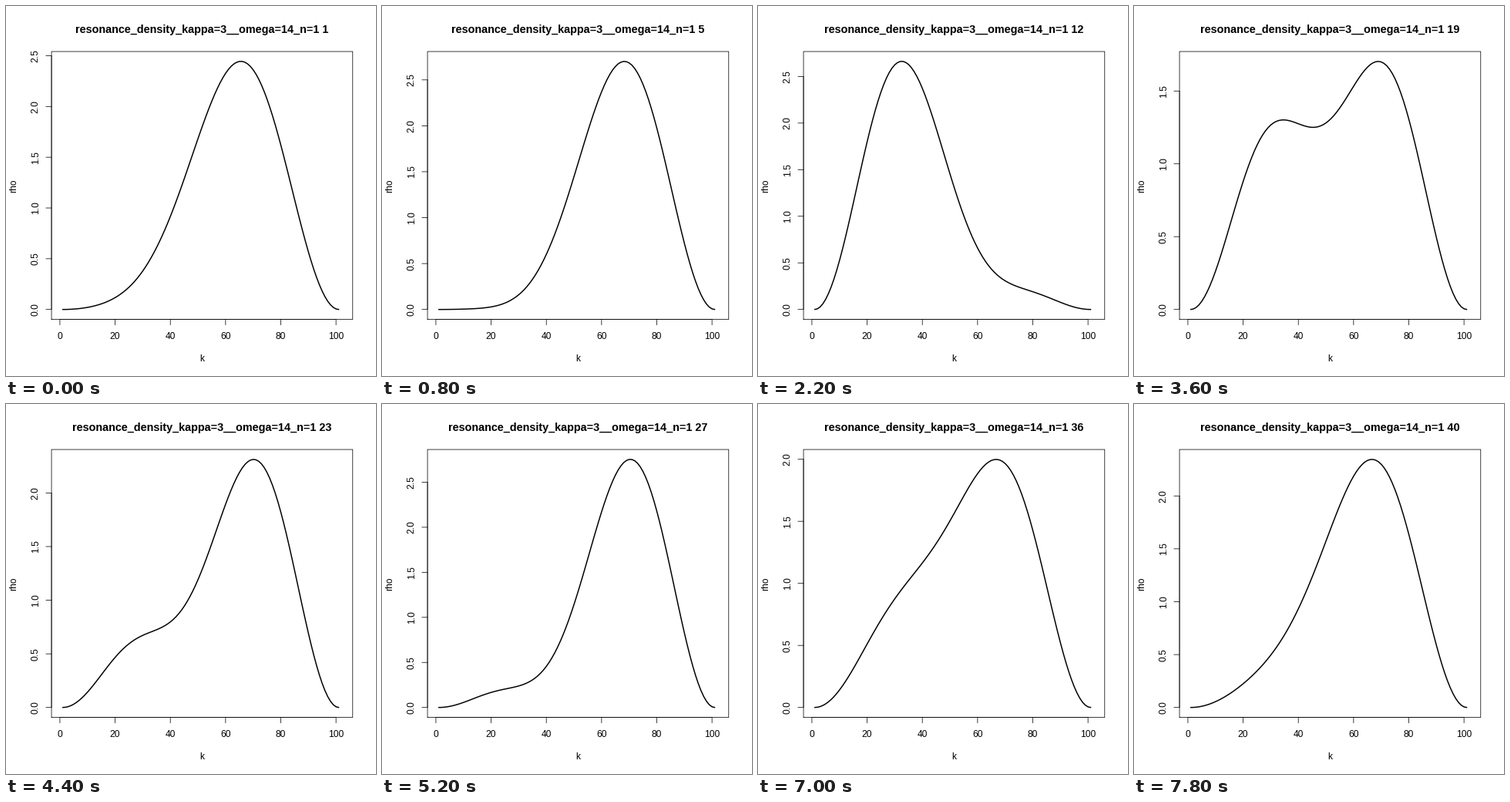
Recreate the animation shown at these times as a matplotlib script. Size 480 by 480 pixels, loop 8 s.

```python
import numpy as np
import matplotlib.pyplot as plt
from matplotlib.animation import FuncAnimation

SIZE, DPI = 480, 72
FRAMES, INTERVAL = 40, 200
LEFT, RIGHT, TOP, BOTTOM = 59.04, 449.76, 59.04, 406.56
TICK = 7.2
THIN, THICK = 0.75, 1.5

plt.rcParams["font.family"] = "Liberation Sans"
plt.rcParams["savefig.dpi"] = DPI

# Driven particle in a box: mixing angle and relative phase of the two lowest levels
STEPS = [0, 8, 11, 18, 26, 31, 39]
ANGLE = [0.602, 1.013, 1.157, 1.50, 1.865, 2.084, 2.459]
PHASE = np.pi + np.array([0.355, 11.916, 16.328, 26.567, 38.278, 45.631, 57.252])
MIX_MAX = 0.382

K = np.arange(1, 102)
X = (K - 1) / 100
S1, S2, S3 = (np.sin(n * np.pi * X) for n in (1, 2, 3))


def density(step):
    theta = np.interp(step, STEPS, ANGLE)
    phi = np.interp(step, STEPS, PHASE)
    mix = MIX_MAX * np.sin(theta) ** 2
    a, b = np.sqrt(1 - mix), np.sqrt(mix)
    lag = np.pi / 2 - np.arctan2(0.79 * np.sin(theta), np.cos(theta))
    drive = phi + lag
    twice = np.exp(-1j * (phi + drive))
    # small off-resonant terms, including the third level
    c1 = a - 0.010 * b * twice
    c2 = b * np.exp(-1j * phi) + 0.010 * a * np.exp(1j * drive)
    c3 = b * (0.027 * twice + 0.008 * np.exp(1j * lag))
    return 2 * np.abs(c1 * S1 + c2 * S2 + c3 * S3) ** 2


def px(k):
    unit = (RIGHT - LEFT) / (1.08 * 101)
    return LEFT + (k - 1 + 0.04 * 101) * unit


def py(value, peak):
    unit = (BOTTOM - TOP) / (1.08 * peak)
    return BOTTOM - (value + 0.04 * peak) * unit


fig = plt.figure(figsize=(SIZE / DPI, SIZE / DPI), dpi=DPI, facecolor="white")
ax = fig.add_axes([0, 0, 1, 1])
ax.set_xlim(0, SIZE)
ax.set_ylim(SIZE, 0)
ax.axis("off")


def stroke(xs, ys, width=THIN):
    line, = ax.plot(xs, ys, color="black", lw=width, snap=False,
                    solid_capstyle="round", solid_joinstyle="round")
    return line


def label(x, y, text, size=12, **style):
    return ax.text(x, y, text, fontsize=size, color="black", ha="center",
                   va="baseline", rotation_mode="anchor", **style)


mid_x, mid_y = (LEFT + RIGHT) / 2, (TOP + BOTTOM) / 2

stroke([LEFT, RIGHT, RIGHT, LEFT, LEFT], [BOTTOM, BOTTOM, TOP, TOP, BOTTOM])
stroke([px(0), px(100)], [BOTTOM, BOTTOM])
for k in range(0, 101, 20):
    stroke([px(k), px(k)], [BOTTOM, BOTTOM + TICK])
    label(px(k), 432.4, str(k))
label(mid_x, 461.2, "k")
label(12.96, mid_y, "rho", rotation=90)

title = label(mid_x, 34.8, "", 14.4, weight="bold")
curve = stroke([], [], THICK)
y_axis = stroke([], [])
levels = np.arange(0, 3.6, 0.5)
y_ticks = [(v, stroke([], []), label(41.76, 0, f"{v:.1f}", rotation=90))
           for v in levels]


def draw(step):
    rho = density(step)
    peak = rho.max()
    title.set_text(f"resonance_density_kappa=3__omega=14_n=1 {step + 1}")
    curve.set_data(px(K), py(rho, peak))
    last = levels[levels <= 1.04 * peak].max()
    y_axis.set_data([LEFT, LEFT], [py(0, peak), py(last, peak)])
    for value, mark, text in y_ticks:
        y = py(value, peak)
        mark.set_data([LEFT - TICK, LEFT], [y, y])
        text.set_y(y)
        mark.set_visible(value <= last)
        text.set_visible(value <= last)
    return []


anim = FuncAnimation(fig, draw, frames=FRAMES, interval=INTERVAL,
                     init_func=lambda: draw(0), repeat=True, repeat_delay=0)
plt.show()
```
